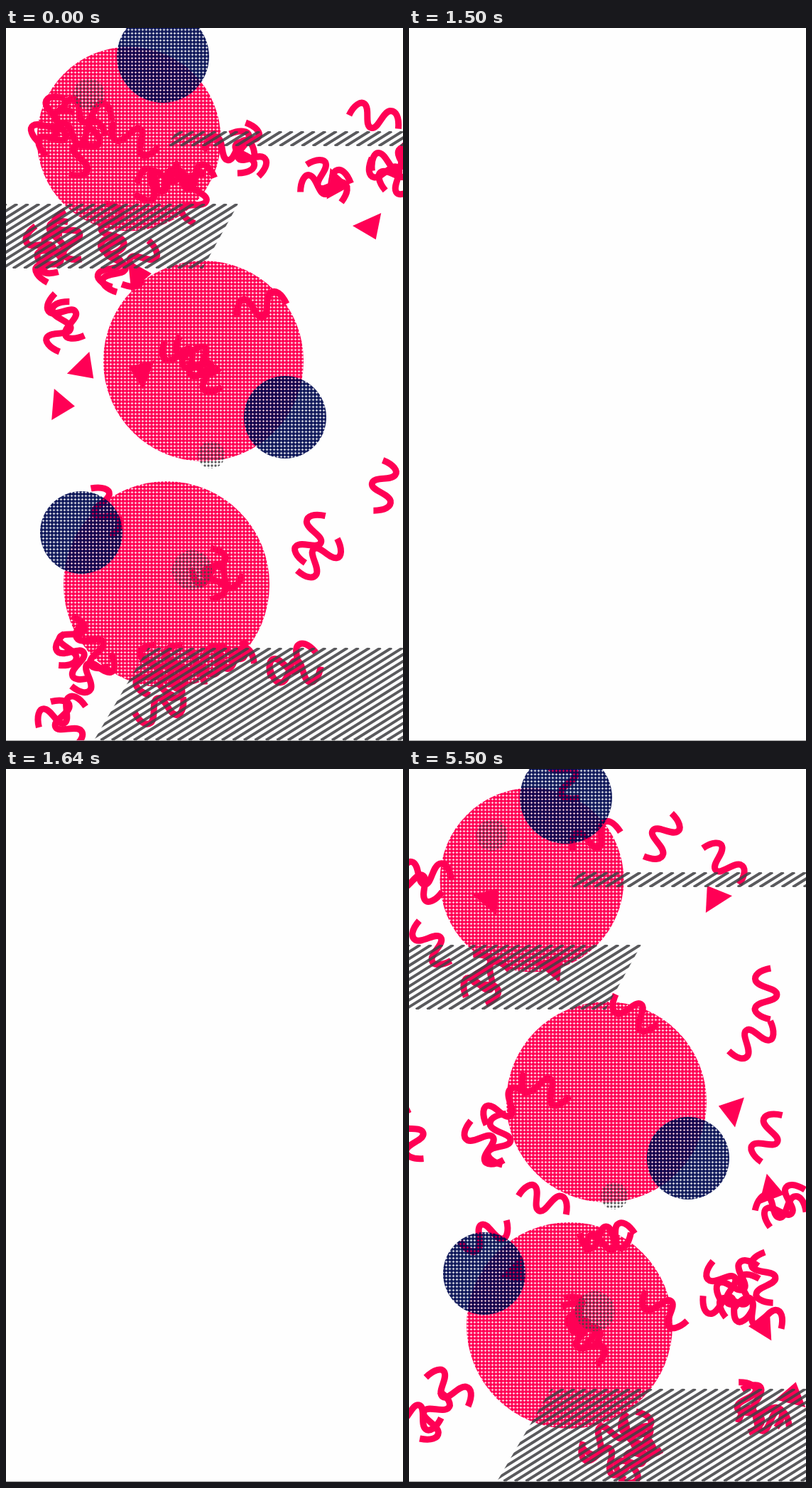
These frames come from a looping animation (559 px wide and 1002 px high, 8000 ms). An HTML page with a canvas:

```html
<!DOCTYPE html>
<html lang="en">
<head>
<meta charset="utf-8">
<title>Confetti</title>
<style>
  html, body { margin: 0; width: 100%; height: 100%; overflow: hidden; background: #fefefe; }
  canvas { display: block; }
</style>
</head>
<body>
<canvas id="stage" width="559" height="1002"></canvas>
<script>
const ctx = document.getElementById('stage').getContext('2d');
const PAPER = '#fefefe', PINK = '#ff0055', NAVY = 'rgba(0,10,80,.92)', GREY = 'rgba(66,66,70,.87)';
const LOOP = 8000, PITCH = 5;

const ribbon = new Path2D(
  'M-36,1C-33,-15 -25,-23 -19,-20C-9,-15 -12,10 -1,10C9,10 8,-15 18,-20C26,-23 33,-15 36,1');
const triangle = new Path2D('M-22,-12H22L0,19Z');

// Each burst scatters `count` ribbons around a point: x, y, count.
const first = {
  seed: 11,
  bursts: [
    [100,150,5], [183,150,1], [240,235,4], [332,185,3], [455,228,2], [545,210,3],
    [518,131,1], [62,312,4], [165,312,4], [90,410,2], [260,465,3], [360,396,1],
    [432,730,2], [525,643,1], [300,773,2], [134,680,1], [115,890,4], [78,970,2],
    [225,920,5], [310,890,2], [398,905,2]
  ],
  triangles: [[466,220], [513,280], [186,347], [110,479], [78,530], [190,483]]
};

const second = {
  seed: 23,
  bursts: [
    [225,8,1], [22,155,2], [264,101,1], [351,93,1], [440,136,1], [36,242,1],
    [105,302,2], [508,316,1], [480,376,1], [320,338,1], [193,444,1], [124,500,3],
    [188,612,1], [10,513,1], [510,519,1], [525,622,2], [105,650,1], [278,658,2],
    [362,755,1], [225,795,3], [475,740,6], [30,895,3], [300,958,6], [490,905,3]
  ],
  triangles: [[430,180], [114,182], [203,277], [454,479], [510,593], [151,708], [497,782], [540,880]]
};

// Small seeded generator, values from 0 to 1.
function randomFrom(seed) {
  return () => {
    seed = (seed * 16807) % 2147483647;
    return seed / 2147483647;
  };
}

function place(x, y, angle, paint) {
  ctx.save();
  ctx.translate(x, y);
  ctx.rotate(angle);
  paint();
  ctx.restore();
}

function confetti({ seed, bursts, triangles }) {
  const random = randomFrom(seed * 7919);
  const turn = () => random() * 2 * Math.PI;
  ctx.strokeStyle = ctx.fillStyle = PINK;
  ctx.lineWidth = 9;
  for (const [x, y, count] of bursts) {
    const spread = Math.min(count - 1, 3) * 24;
    const offset = () => (random() - .5) * spread;
    for (let i = 0; i < count; i++) {
      place(x + offset(), y + offset(), turn(), () => ctx.stroke(ribbon));
    }
  }
  for (const [x, y] of triangles) place(x, y, turn(), () => ctx.fill(triangle));
}

// All halftones share one grid, so their gaps line up where discs overlap.
function halftone(cx, cy, radius, dot, color) {
  const snap = v => Math.floor(v / PITCH) * PITCH;
  ctx.save();
  ctx.beginPath();
  ctx.arc(cx, cy, radius, 0, 7);
  ctx.clip();
  ctx.beginPath();
  for (let x = snap(cx - radius); x <= cx + radius + PITCH; x += PITCH) {
    for (let y = snap(cy - radius); y <= cy + radius + PITCH; y += PITCH) {
      ctx.moveTo(x + dot, y);
      ctx.arc(x, y, dot, 0, 7);
    }
  }
  ctx.fillStyle = color;
  ctx.fill();
  ctx.restore();
}

// A hatched band between two heights; its ends slant from top x to bottom x.
function stripes(top, bottom, [leftTop, leftBottom], [rightTop, rightBottom]) {
  const lean = (bottom - top) * 1.6;
  ctx.save();
  ctx.beginPath();
  ctx.moveTo(leftTop, top);
  ctx.lineTo(rightTop, top);
  ctx.lineTo(rightBottom, bottom);
  ctx.lineTo(leftBottom, bottom);
  ctx.clip();
  ctx.beginPath();
  for (let x = -lean - 15; x < 575; x += 15.5) {
    ctx.moveTo(x, bottom);
    ctx.lineTo(x + lean, top);
  }
  ctx.strokeStyle = GREY;
  ctx.lineWidth = 3.9;
  ctx.stroke();
  ctx.restore();
}

function backdrop() {
  halftone(173, 156, 129.5, 2.5, PINK);
  halftone(278, 468, 141, 2.5, PINK);
  halftone(226, 782, 145, 2.5, PINK);
  stripes(145, 166, [240, 226], [559, 559]);
  stripes(247, 338, [0, 0], [327, 277]);
  stripes(871, 1001, [200, 124], [559, 559]);
  halftone(221, 40, 65, 2.5, NAVY);
  halftone(393, 547, 58, 2.5, NAVY);
  halftone(106, 709, 58, 2.5, NAVY);
  halftone(117, 93, 22, 1.7, GREY);
  halftone(289, 600, 19, 1.7, GREY);
  halftone(262, 762, 28, 1.7, GREY);
}

function draw(scene) {
  ctx.fillStyle = PAPER;
  ctx.fillRect(0, 0, 559, 1002);
  if (scene) {
    confetti(scene);
    backdrop();
  }
  ctx.fillStyle = '#999';
  ctx.fillRect(0, 1001, 559, 1);
}

const sceneAt = t => t < 1500 ? first : t < 1740 ? null : second;
const start = performance.now();
let shown;

function tick() {
  const scene = sceneAt((performance.now() - start) % LOOP);
  if (scene !== shown) draw(shown = scene);
  requestAnimationFrame(tick);
}
tick();
</script>
</body>
</html>
```
